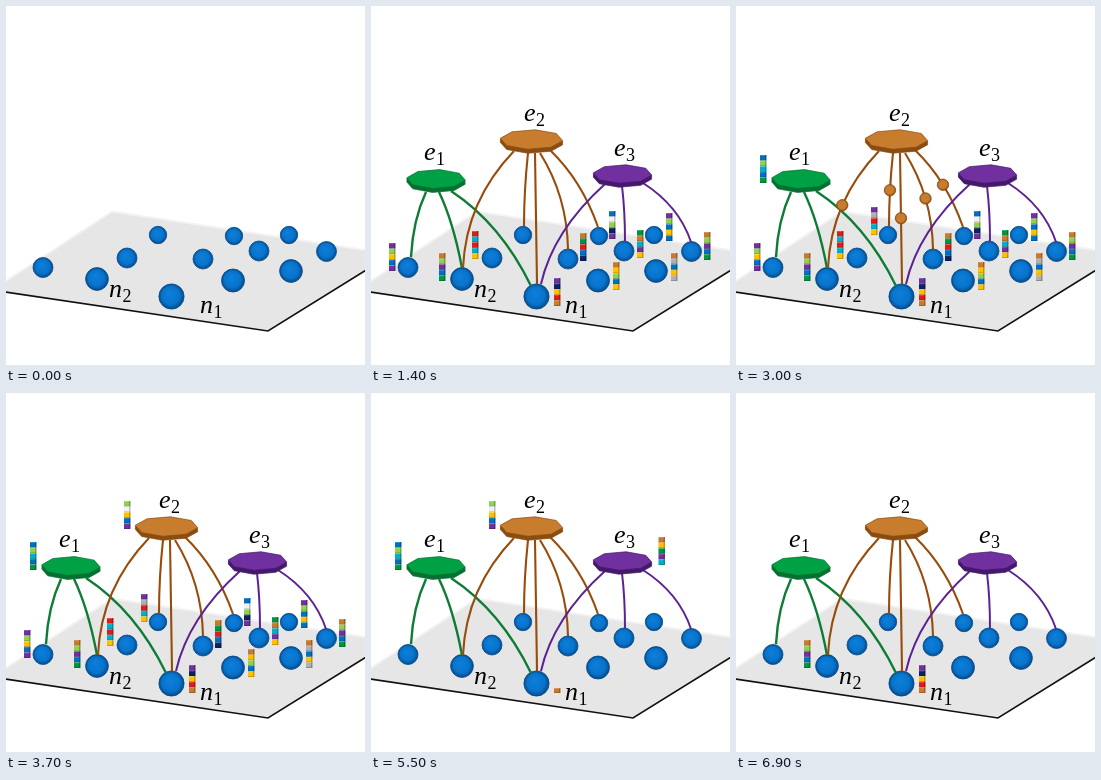
These frames come from a looping animation (359x359 px, 7000 ms). An HTML page with a canvas:

```html
<!DOCTYPE html>
<html lang="en">
<head>
<meta charset="utf-8">
<title>Hypergraph message passing</title>
<style>
html, body { margin: 0; width: 100%; height: 100%; overflow: hidden; background: #fff; }
canvas { display: block; width: 359px; height: 359px; }
</style>
</head>
<body>
<canvas id="stage"></canvas>
<script>
const canvas = document.getElementById('stage');
const ctx = canvas.getContext('2d');
const ratio = window.devicePixelRatio || 1;
canvas.width = canvas.height = Math.round(359 * ratio);

const LOOP = 7000, STEP = 100;
const progress = (t, start, end) => Math.min(1, Math.max(0, (t - start) / (end - start)));

const palette = {
  p: '#7030a0', l: '#92d050', y: '#ffc000', b: '#0070c0', g: '#00953f', o: '#c97a2b',
  r: '#e01b1b', c: '#00b0c8', n: '#0b2265', w: '#f2f2f2', s: '#b0b0b0'
};

// x, y, radius
const nodes = [
  [152, 229, 8.7], [228, 230, 8.7], [283, 229, 8.7], [253, 245, 10], [320.5, 245.5, 10],
  [121, 252, 10], [197, 253, 10], [37, 261.5, 10], [285, 265, 11.4], [227, 274.5, 11.5],
  [91, 273, 11.4], [165.5, 290.5, 12.6]
];

// left, top, block colours from the top down
const n1Stack = [183, 272, 'pnyro'], n2Stack = [68, 247, 'olpbg'];
const nodeStacks = [
  n1Stack, n2Stack, [18, 237, 'plybp'], [101, 225, 'rcrcy'], [209, 227, 'ogrbn'],
  [242, 256, 'oylby'], [238, 205, 'bwlnp'], [266, 224, 'gocpy'], [295, 207, 'plbyb'],
  [300, 247, 'osbys'], [333, 226, 'olpbg'], [135, 201, 'psrcy']
];

// Each edge: start, control point, end at the node
const hyperedges = [
  {
    x: 65, y: 174, rx: 29.5, ry: 9.5, label: ['1', 53, 154],
    top: '#00a044', side: '#087032', line: '#0f7c36', width: 2.4,
    show: 200, send: [1700, 2250, 2650], stack: [24, 149, 'blcbg'],
    edges: [[55, 186, 42, 214, 40, 251], [68, 186, 82, 215, 91, 262], [80, 185, 130, 218, 160, 280]],
    toN1: 2, toN2: 1
  },
  {
    x: 160.5, y: 134.5, rx: 31.5, ry: 9.8, label: ['2', 153, 115],
    top: '#c87d2e', side: '#8a4d12', line: '#974c0c', width: 2.1,
    show: 400, send: [2750, 3250, 3650], stack: [118, 108, 'lwybp'],
    edges: [
      [143, 145, 95, 195, 92, 262], [157, 147, 153, 185, 153, 220], [164, 147, 165, 212, 166, 278],
      [169, 147, 196, 190, 197, 243], [179, 144, 211, 175, 227, 221]
    ],
    toN1: 2, toN2: 0
  },
  {
    x: 251.5, y: 169, rx: 29.5, ry: 9.3, label: ['3', 243, 150],
    top: '#7030a0', side: '#451a6b', line: '#5b2292', width: 2,
    show: 600, send: [3750, 4250, 4650], stack: [287.5, 144, 'oygpc'],
    edges: [[234, 178, 182, 225, 170, 278], [251, 180, 254, 205, 254, 235], [272, 177, 308, 200, 320, 236]],
    toN1: 0
  }
];

function polygon(points, fill, stroke) {
  ctx.beginPath();
  points.forEach(([x, y]) => ctx.lineTo(x, y));
  ctx.closePath();
  ctx.fillStyle = fill;
  ctx.fill();
  if (stroke) {
    ctx.strokeStyle = stroke;
    ctx.lineWidth = 0.7;
    ctx.stroke();
  }
}

function polyline(points, color, width) {
  ctx.beginPath();
  points.forEach(([x, y]) => ctx.lineTo(x, y));
  ctx.strokeStyle = color;
  ctx.lineWidth = width;
  ctx.stroke();
}

function drawPlane() {
  const left = [-14, 284], back = [106, 205.5], right = [386, 248], front = [262, 325];
  polygon([left, back, right, front], '#e6e6e6');
  polyline([left, back, right], '#f3f3f3', 2);
  polyline([left, front, right], '#111', 1.6);
}

function drawBall(x, y, r, light, base, dark) {
  const shade = ctx.createRadialGradient(x - r * 0.2, y - r * 0.3, 0, x, y, r);
  shade.addColorStop(0, light);
  shade.addColorStop(0.7, base);
  shade.addColorStop(1, dark);
  ctx.beginPath();
  ctx.arc(x, y, r, 0, Math.PI * 2);
  ctx.fillStyle = shade;
  ctx.fill();
  ctx.strokeStyle = dark;
  ctx.lineWidth = 0.8;
  ctx.stroke();
}

function drawLabel(letter, index, x, y) {
  ctx.fillStyle = '#000';
  ctx.font = 'italic 26px "Liberation Serif", serif';
  ctx.fillText(letter, x, y);
  ctx.font = '18px "Liberation Serif", serif';
  ctx.fillText(index, x + (letter === 'n' ? 13.5 : 12), y + 4.5);
}

// Stack of cubes, wiped in from the bottom
function drawStack([x, y, colors], amount) {
  if (amount <= 0) return;
  const height = 29;
  ctx.save();
  ctx.beginPath();
  ctx.rect(x - 1, y + height * (1 - amount), 10, height * amount);
  ctx.clip();
  [...colors].forEach((key, i) => {
    const top = y + i * 5.6;
    ctx.fillStyle = palette[key];
    ctx.fillRect(x, top, 6.4, 5.6);
    ctx.fillStyle = 'rgba(0,0,0,.28)';
    ctx.fillRect(x + 5.2, top, 1.2, 5.6);
    ctx.fillRect(x, top + 4.9, 5.2, 0.7);
    ctx.fillStyle = 'rgba(255,255,255,.25)';
    ctx.fillRect(x, top, 5.2, 0.8);
  });
  ctx.restore();
}

function drawHyperedge(h) {
  ctx.strokeStyle = h.line;
  ctx.lineWidth = h.width;
  for (const [x, y, cx, cy, ex, ey] of h.edges) {
    ctx.beginPath();
    ctx.moveTo(x, y);
    ctx.quadraticCurveTo(cx, cy, ex, ey);
    ctx.stroke();
  }
  const octagon = dy => Array.from({ length: 8 }, (_, i) => {
    const a = i * Math.PI / 4 + 0.12;
    return [h.x + h.rx * Math.cos(a), h.y + dy + h.ry * Math.sin(a)];
  });
  for (let dy = 3; dy >= 0; dy--) polygon(octagon(dy), h.side, h.side);
  polygon(octagon(-1), h.top, h.side);
  drawLabel('e', ...h.label);
}

// u runs from 0 at the hyperedge to 1 at the node
function drawDot(h, [x, y, cx, cy, ex, ey], u) {
  const v = 1 - u;
  const at = (a, b, c) => v * v * a + 2 * u * v * b + u * u * c;
  drawBall(at(x, cx, ex), at(y, cy, ey), 5.7, h.top, h.top, h.side);
}

function drawDownward(t, start, end, target) {
  if (t < start || t >= end) return;
  for (const h of hyperedges) {
    if (target in h) drawDot(h, h.edges[h[target]], progress(t, start, end));
  }
}

function draw(t) {
  ctx.setTransform(ratio, 0, 0, ratio, 0, 0);
  ctx.fillStyle = '#fff';
  ctx.fillRect(0, 0, 359, 359);
  drawPlane();
  nodes.forEach(n => drawBall(...n, '#0c80dc', '#0873cb', '#064b8a'));

  for (const h of hyperedges) {
    ctx.globalAlpha = progress(t, h.show - 100, h.show + 100);
    drawHyperedge(h);
    ctx.globalAlpha = 1;
  }
  drawLabel('n', '2', 103, 291);
  drawLabel('n', '1', 194, 307);

  if (t < 4700) {
    nodeStacks.forEach((s, i) => drawStack(s, progress(t, 850 + i * 50, 900 + i * 50)));
  }
  for (const h of hyperedges) {
    const [start, arrive, done] = h.send;
    if (t >= start && t < arrive) {
      h.edges.forEach(e => drawDot(h, e, 1 - progress(t, start, arrive)));
    }
    if (t < 6900 || h.stack[0] < 0) drawStack(h.stack, t < 5700 ? progress(t, arrive, done) : 0);
  }

  drawDownward(t, 4900, 5400, 'toN1');
  drawStack(n1Stack, progress(t, 5400, 5900));
  drawDownward(t, 6000, 6400, 'toN2');
  drawStack(n2Stack, progress(t, 6400, 6800));
}

function frame() {
  draw(Math.floor(performance.now() % LOOP / STEP) * STEP);
  requestAnimationFrame(frame);
}
frame();
</script>
</body>
</html>
```
